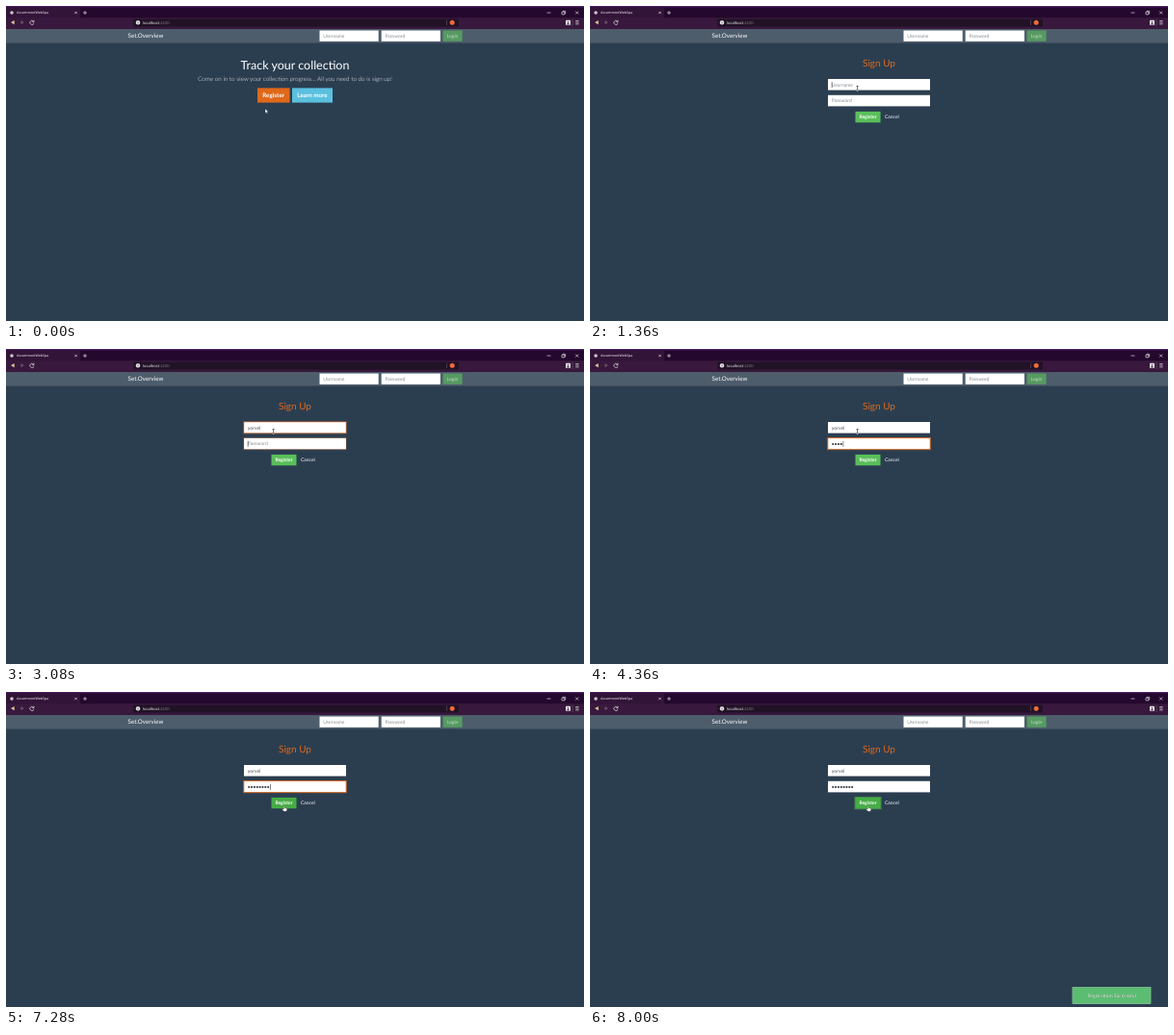
These frames come from a looping animation (600 by 328 pixels, 8040 ms). An HTML page:

```html
<!DOCTYPE html>
<html lang="en">
<head>
<meta charset="utf-8">
<title>Sign up demo</title>
<style>
html, body { margin: 0; width: 100%; height: 100%; overflow: hidden; background: #2b3e50 }
svg { display: block; width: 600px; height: 328px }
text { font: 5px Lato, sans-serif; fill: #fff; text-rendering: geometricPrecision }
.ui { font-family: "Open Sans", sans-serif }
.lead { font-size: 6.25px; font-weight: 300 }
.brand { font-size: 6.25px }
.big { font-size: 6.25px; font-weight: 700 }
.bold { font-weight: 700 }
.mid { text-anchor: middle }
.hint { fill: #868e96 }
.typed { fill: #495057 }
.line { fill: none; stroke: #ddd; stroke-width: .7 }
.ring { fill: none; stroke: #dc6f2c; stroke-width: 1 }
</style>
</head>
<body>
<svg viewBox="0 0 600 328">
  <rect width="600" height="328" fill="#2b3e50"/>

  <!-- browser bar -->
  <rect width="600" height="13" fill="#25082d"/>
  <rect width="600" height="1.4" fill="#45185a"/>
  <rect y="1.4" width="77" height="11.6" fill="#321438"/>
  <rect y="12.2" width="600" height="11.8" fill="#38193d"/>
  <circle cx="6" cy="7" r="1.8" fill="#c8c8c8"/>
  <text class="ui" x="11" y="8.4" style="font-size:3.6px">AssortmentWebSpa</text>
  <path class="line" d="M71.3 5.8l2.4 2.4m0-2.4l-2.4 2.4M80 7h4M82 5v4M561.500 7h4M577 6.200h2.800v2.600H577zM578 6v-.7h2.700v2.600h-.7M591.200 5.500l3 3m0-3l-3 3"/>
  <path d="M8.700 14.900v4.400L5 17.100z" fill="#e5c9a0"/>
  <path d="M15.300 14.900v4.400l3.700-2.200z" fill="#674c66"/>
  <path class="line" d="M28.600 16A2.100 2.100 0 1 0 29 17.700M29 14.700v1.800h-1.800"/>
  <rect x="132" y="13.400" width="338" height="8" rx="1" fill="#211226"/>
  <circle cx="137" cy="17.300" r="2.200" fill="#e8e8e8"/>
  <path d="M137 16.900v1.400M137 15.800v.5" stroke="#211226" stroke-width=".6"/>
  <text class="ui" x="142" y="18.800" style="font-size:4.100px">localhost<tspan fill="#8b808e">:4200</tspan></text>
  <path d="M457.500 14.500v5.500M588 13.500v7.500" stroke="#71617a" stroke-width=".5"/>
  <circle cx="463.200" cy="17.200" r="2.500" fill="#ee6a3c"/>
  <rect x="581" y="14.800" width="5" height="5" rx=".6" fill="#eee"/>
  <path d="M582.200 19.200a1.300 1.300 0 0 1 2.600 0z" fill="#38193d"/>
  <circle cx="583.500" cy="16.700" r=".8" fill="#38193d"/>
  <path class="line" d="M591.200 15.500h3.400m-3.400 1.700h3.400m-3.400 1.700h3.400"/>

  <!-- page header -->
  <rect y="24" width="600" height="14.500" fill="#4e5d6c"/>
  <text class="brand" x="126.600" y="33.200">Set.Overview</text>
  <rect x="325.500" y="25.500" width="61.200" height="11.300" fill="#fff"/>
  <rect x="389.700" y="25.500" width="61.200" height="11.300" fill="#fff"/>
  <text class="hint" x="329.300" y="33">Username</text>
  <text class="hint" x="393.400" y="33">Password</text>
  <rect x="453.600" y="25.500" width="20" height="11.300" fill="#579a62"/>
  <text class="mid" x="463.500" y="32.900" fill-opacity=".65">Login</text>

  <g id="home">
    <text class="mid" x="300" y="65.500" style="font-size:12.500px">Track your collection</text>
    <text class="mid lead" x="300" y="78.200">Come on in to view your collection progress... All you need to do is sign up!</text>
    <rect id="join" x="261" y="85.400" width="33.600" height="15.200"/>
    <text class="mid big" x="277.700" y="95.200">Register</text>
    <rect x="297" y="85.400" width="42" height="15.200" fill="#5bc0de"/>
    <text class="mid big" x="318" y="95.200">Learn more</text>
  </g>

  <g id="form">
    <text class="mid" x="300" y="63" style="font-size:10px;fill:#df691a">Sign Up</text>
    <rect x="247" y="76" width="106" height="11.600" fill="#fff"/>
    <rect x="247" y="92.800" width="106" height="11.600" fill="#fff"/>
    <rect id="userRing" class="ring" x="246.800" y="75.800" width="106.400" height="12"/>
    <rect id="passRing" class="ring" x="246.800" y="92.600" width="106.400" height="12"/>
    <text id="user" x="250.800" y="83.600"></text>
    <text id="passHint" class="hint" x="250.800" y="100.400">Password</text>
    <g id="dots" fill="#343a40"></g>
    <rect id="caret" width=".6" height="6" fill="#333"/>
    <rect id="sendRing" x="274.500" y="108.900" width="28" height="13.400" fill="#44804f"/>
    <rect id="send" x="275.500" y="109.900" width="26" height="11.400"/>
    <text class="mid bold" x="288.500" y="117.300">Register</text>
    <text class="mid" x="313.400" y="117.300">Cancel</text>
  </g>

  <g id="toast">
    <rect x=".2" y="307.300" width="81.200" height="17.500" fill="#5bbd72" stroke="#b4d9bd" stroke-width=".4"/>
    <text class="mid" x="40.500" y="317.700" style="fill:#2d5e39">Registration Successful</text>
    <text class="mid" x="40.800" y="318">Registration Successful</text>
  </g>

  <path id="arrow" d="M0 0v4.600l1.100-1 .8 1.700.8-.4-.8-1.600h1.500z" fill="#fff" stroke="#111" stroke-width=".3"/>
  <path id="beam" d="M-1-2.500h2M0-2.500v5M-1 2.500h2" stroke="#fff" stroke-width=".6" style="mix-blend-mode:difference"/>
  <path id="hand" d="M-.5 0q.5-.6 1 0v2l2.100.5q.5.200.4.900l-.5 2.200h-3l-1.700-2.200q0-.8.800-.5l.9.600z" fill="#fff" stroke="#111" stroke-width=".3"/>
</svg>
<script>
const LOOP = 8040, BLINK = 525;
const OPEN = 840, USER_FOCUS = 1355, PASS_FOCUS = 3035, CLICK = 7440, TOAST = 7540;
const NAME = 'yorvel';
const nameKeys = [2150, 2230, 2310, 2510, 2640, 2790];
const passKeys = [3350, 3510, 3710, 3910, 4550, 4710, 4870, 5150];
// pointer stops: time, x, y
const stops = [[40, 269, 107], [700, 278, 94], [880, 278, 94], [1300, 277.600, 86], [6200, 277.600, 86], [6800, 288.800, 118.700]];

const el = {};
document.querySelectorAll('[id]').forEach(e => el[e.id] = e);
const set = (e, attrs) => { for (const k in attrs) e.setAttribute(k, attrs[k]); };
const show = (e, on) => { e.style.display = on ? '' : 'none'; };
const clamp = v => Math.min(1, Math.max(0, v));
const fade = (t, from) => clamp((t - from) / 150);
const count = (keys, t) => keys.filter(k => k <= t).length;

for (let i = 0; i < 8; i++) {
  const dot = document.createElementNS('http://www.w3.org/2000/svg', 'circle');
  set(dot, { cx: 252.200 + i * 2.850, cy: 99, r: 1.100 });
  el.dots.append(dot);
}

function bezier(x, x1, y1, x2, y2) {
  const at = (s, a, b) => 3 * (1 - s) ** 2 * s * a + 3 * (1 - s) * s * s * b + s ** 3;
  let lo = 0, hi = 1;
  for (let i = 0; i < 24; i++) {
    const s = (lo + hi) / 2;
    if (at(s, x1, x2) < x) lo = s; else hi = s;
  }
  return at(lo, y1, y2);
}

function pointer(t) {
  let [, x, y] = stops[0];
  for (let i = 1; i < stops.length; i++) {
    const [t0, x0, y0] = stops[i - 1], [t1, x1, y1] = stops[i];
    if (t < t0) break;
    const p = clamp((t - t0) / (t1 - t0)), e = p * p * (3 - 2 * p);
    x = x0 + (x1 - x0) * e;
    y = y0 + (y1 - y0) * e;
  }
  return [x, y];
}

function drawCaret(t, dots) {
  const inPass = t >= PASS_FOCUS;
  const last = Math.max(...[USER_FOCUS, PASS_FOCUS, ...nameKeys, ...passKeys].filter(k => k <= t));
  show(el.caret, t >= USER_FOCUS && t < CLICK && Math.floor((t - last) / BLINK) % 2 === 0);
  const nameEnd = count(nameKeys, t) ? el.user.getComputedTextLength() : 0;
  set(el.caret, {
    x: inPass ? 250.800 + dots * 2.850 + (dots ? .4 : 0) : 250.800 + nameEnd,
    y: inPass ? 95.800 : 79
  });
}

function drawPointer(t, x, y) {
  const home = t < OPEN;
  const overJoin = home && y < 100.600;
  const overSend = !home && y > 109.900;
  const overField = !home && (y < 87.600 || y > 92.800 && y < 104.400);
  const kind = overJoin || overSend ? 'hand' : overField ? 'beam' : 'arrow';
  for (const k of ['arrow', 'beam', 'hand']) {
    show(el[k], k === kind);
    set(el[k], { transform: `translate(${x} ${y})` });
  }
  set(el.join, { fill: overJoin ? '#bd5916' : '#df691a' });
  set(el.send, { fill: overSend ? '#46ad46' : '#5abf5a' });
}

function draw(t) {
  show(el.home, t < OPEN);
  show(el.form, t >= OPEN);

  const letters = count(nameKeys, t), dots = count(passKeys, t);
  el.user.textContent = letters ? NAME.slice(0, letters) : 'Username';
  set(el.user, { class: letters ? 'typed' : 'hint' });
  show(el.passHint, !dots);
  [...el.dots.children].forEach((d, i) => show(d, i < dots));
  set(el.userRing, { opacity: fade(t, USER_FOCUS) - fade(t, PASS_FOCUS) });
  set(el.passRing, { opacity: fade(t, PASS_FOCUS) - fade(t, CLICK) });
  set(el.sendRing, { opacity: fade(t, CLICK) });

  drawCaret(t, dots);
  drawPointer(t, ...pointer(t));

  const slide = bezier(clamp((t - TOAST) / 500), .175, .885, .32, 1.275);
  show(el.toast, t > TOAST);
  set(el.toast, { transform: `translate(${696.900 - 190.600 * slide} 0)` });
}

const start = performance.now();
function tick() {
  draw((performance.now() - start) % LOOP);
  requestAnimationFrame(tick);
}
tick();
</script>
</body>
</html>
```
